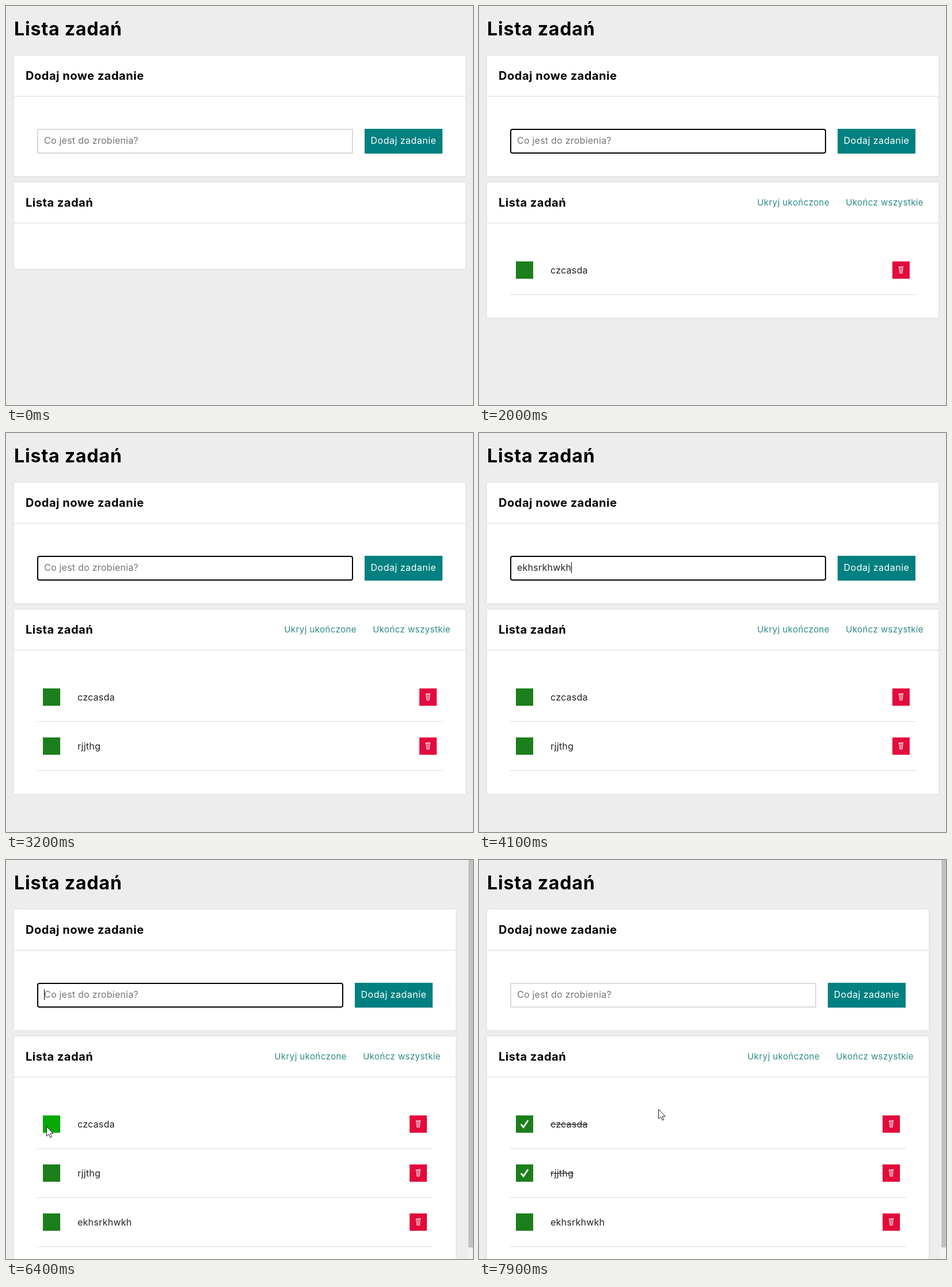
Write an HTML page that moves like this. It is 810 px wide and 692 px high and loops after 8 s.

```html
<!DOCTYPE html>
<html lang="pl">
<head>
<meta charset="utf-8">
<title>Lista zadań</title>
<style>
  html, body { margin: 0; width: 100%; height: 100%; overflow: hidden; background: #ededed; }
  * { box-sizing: border-box; }
  #stage {
    position: relative; width: 810px; height: 692px; overflow: hidden;
    font: 400 16px/20px Inter, "Open Sans", sans-serif;
    letter-spacing: .015em; white-space: nowrap; color: #222;
  }
  #page { position: absolute; left: 0; top: 0; width: 811px; height: 100%; }
  #page.long { width: 794px; }
  h1, h2 { position: absolute; margin: 0; letter-spacing: .026em; color: #000; }
  h1 { left: 14px; top: 20px; font: 700 32px/40px Inter, sans-serif; }
  h2 { left: 20px; top: 0; font: 700 20px/70px Inter, sans-serif; }
  .card {
    position: absolute; left: 14px; right: 14px; background: #fff;
    box-shadow: 0 0 3px #d2d2d2;
  }
  .card::before {
    content: ""; position: absolute; left: 0; right: 0; top: 70px;
    border-top: 1px solid #dcdcdc;
  }
  #form { top: 86px; height: 209px; }
  #list { top: 306px; height: 150px; }
  #field {
    position: absolute; left: 40px; right: 195px; top: 127px; height: 43px;
    padding: 0 10px; border: 2px solid #dadada; line-height: 37px;
  }
  #field.focus { border-color: #000; border-radius: 4px; }
  #hint { color: #757575; }
  #caret {
    display: inline-block; width: 1px; height: 19px; margin-right: -1px;
    vertical-align: -4px; background: #000;
  }
  #add {
    position: absolute; right: 40px; top: 127px; width: 135px; height: 43px;
    background: #008080; color: #fff; line-height: 41px; text-align: center;
    letter-spacing: .03em;
  }
  .link {
    position: absolute; top: 25px; font-size: 15px; letter-spacing: .028em; color: #2d8a87;
  }
  .row {
    position: absolute; left: 40px; right: 40px; height: 85px;
    border-bottom: 1px solid #dcdcdc; line-height: 84px;
  }
  .name { position: absolute; left: 70px; }
  .done .name { text-decoration: line-through; }
  .box { position: absolute; top: 27px; width: 30px; height: 30px; }
  .box svg { position: absolute; left: 0; top: 0; }
  .check { left: 10px; background: #1b7f1b; }
  .check.hover { background: #04a904; }
  .check svg { visibility: hidden; }
  .done .check svg { visibility: visible; }
  .bin { right: 10px; background: #e30a3c; }
  #bar {
    position: absolute; left: 800px; top: 0; width: 10px; height: 692px; background: #f1f1f1;
  }
  #bar::before {
    content: ""; position: absolute; left: 2px; top: 0; width: 8px; height: 672px;
    background: #c1c1c1;
  }
  #mouse { position: absolute; left: 0; top: 0; overflow: visible; }
</style>
</head>
<body>
<div id="stage">
  <div id="page">
    <h1>Lista zadań</h1>
    <div class="card" id="form">
      <h2>Dodaj nowe zadanie</h2>
      <div id="field"><span id="typed"></span><span id="caret"></span><span id="hint">Co jest do zrobienia?</span></div>
      <div id="add">Dodaj zadanie</div>
    </div>
    <div class="card" id="list">
      <h2>Lista zadań</h2>
      <div id="links">
        <span class="link" style="right:189px">Ukryj ukończone</span>
        <span class="link" style="right:26px">Ukończ wszystkie</span>
      </div>
    </div>
  </div>
  <div id="bar"></div>
  <svg id="mouse" width="14" height="21">
    <path d="M.5 .5V17L4.2 13.6L6.8 19.4L9.3 18.3L6.8 12.6H12Z" fill="#fff" stroke="#222"/>
  </svg>
</div>
<script>
const LOOP = 8000, STEP = 100;
const FOCUS = 800, BLUR = 6500;
const $ = id => document.getElementById(id);
const show = (el, on) => { el.style.visibility = on ? "visible" : "hidden"; };

// keys: [time, letters typed so far]
const tasks = [
  { name: "czcasda", added: 2000, done: 6500,
    keys: [[1100, 1], [1300, 3], [1500, 4], [1600, 6], [1800, 7]] },
  { name: "rjjthg", added: 3200, done: 7200,
    keys: [[2300, 1], [2400, 2], [2500, 3], [2700, 4], [2800, 5], [3000, 6]] },
  { name: "ekhsrkhwkh", added: 4600, done: Infinity,
    keys: [[3500, 1], [3600, 2], [3700, 4], [3800, 5], [3900, 7], [4000, 8], [4100, 10]] }
];

// Pointer paths: [time, x, y]
const paths = [
  [[100, 352, 538], [200, 248, 382], [300, 248, 382]],
  [[5500, 189, 478], [5700, 130, 470], [6000, 72, 464], [6400, 70, 462],
   [6600, 70, 462], [7000, 76, 541], [7300, 76, 541], [7500, 130, 505],
   [7800, 295, 440], [7900, 311, 432], [8000, 311, 432]]
];

// Empty-field spans with the caret switched off
const blinks = [[2000, 2300], [3200, 3500], [4600, 5100], [5600, 6000]];

tasks.forEach((task, i) => {
  const row = document.createElement("div");
  row.className = "row";
  row.style.top = 110 + 85 * i + "px";
  row.innerHTML = `
    <div class="box check"><svg width="30" height="30">
      <path d="M9.5 16.2L13 20.5L20.5 9.5" fill="none" stroke="#fff" stroke-width="2.8" stroke-linecap="round"/>
    </svg></div>
    <span class="name">${task.name}</span>
    <div class="box bin"><svg width="30" height="30" fill="none" stroke="#f7dfe5">
      <path d="M11 10.5V9.5L18.5 8.5V10.5ZM11.8 11L12.8 20.5H17.2L18.2 11M14 11.5V19.5M16 11.5V19.5"/>
    </svg></div>`;
  $("list").append(row);
  task.row = row;
  task.check = row.querySelector(".check");
});

function pointerAt(t) {
  const path = paths.find(p => t >= p[0][0] && t < p[p.length - 1][0]);
  if (!path) return null;
  const i = path.findIndex(p => p[0] > t);
  const [t0, x0, y0] = path[i - 1], [t1, x1, y1] = path[i];
  const k = (t - t0) / (t1 - t0);
  return [x0 + (x1 - x0) * k, y0 + (y1 - y0) * k];
}

function typedAt(t) {
  const task = tasks.find(k => t < k.added);
  if (!task) return "";
  const count = task.keys.reduce((n, [at, len]) => t >= at ? len : n, 0);
  return task.name.slice(0, count);
}

function draw(t) {
  const focused = t >= FOCUS && t < BLUR;
  const text = typedAt(t);
  $("field").className = focused ? "focus" : "";
  $("typed").textContent = text;
  show($("hint"), !text);
  show($("caret"), focused && !blinks.some(([a, b]) => t >= a && t < b));

  const mouse = pointerAt(t);
  show($("mouse"), mouse);
  if (mouse) $("mouse").style.transform = `translate(${mouse[0]}px, ${mouse[1]}px)`;

  const count = tasks.filter(k => t >= k.added).length;
  tasks.forEach((task, i) => {
    const top = 443 + 85 * i;
    const hover = mouse && mouse[0] >= 64 && mouse[0] < 94 && mouse[1] >= top && mouse[1] < top + 30;
    task.row.style.display = i < count ? "" : "none";
    task.row.classList.toggle("done", t >= task.done);
    task.check.classList.toggle("hover", !!hover);
  });
  $("list").style.height = 150 + 85 * count + "px";
  show($("links"), count > 0);
  $("page").className = count > 2 ? "long" : "";
  show($("bar"), count > 2);
}

function tick() {
  const t = performance.now() % LOOP;
  draw(Math.floor(t / STEP) * STEP);
  requestAnimationFrame(tick);
}
tick();
</script>
</body>
</html>
```
